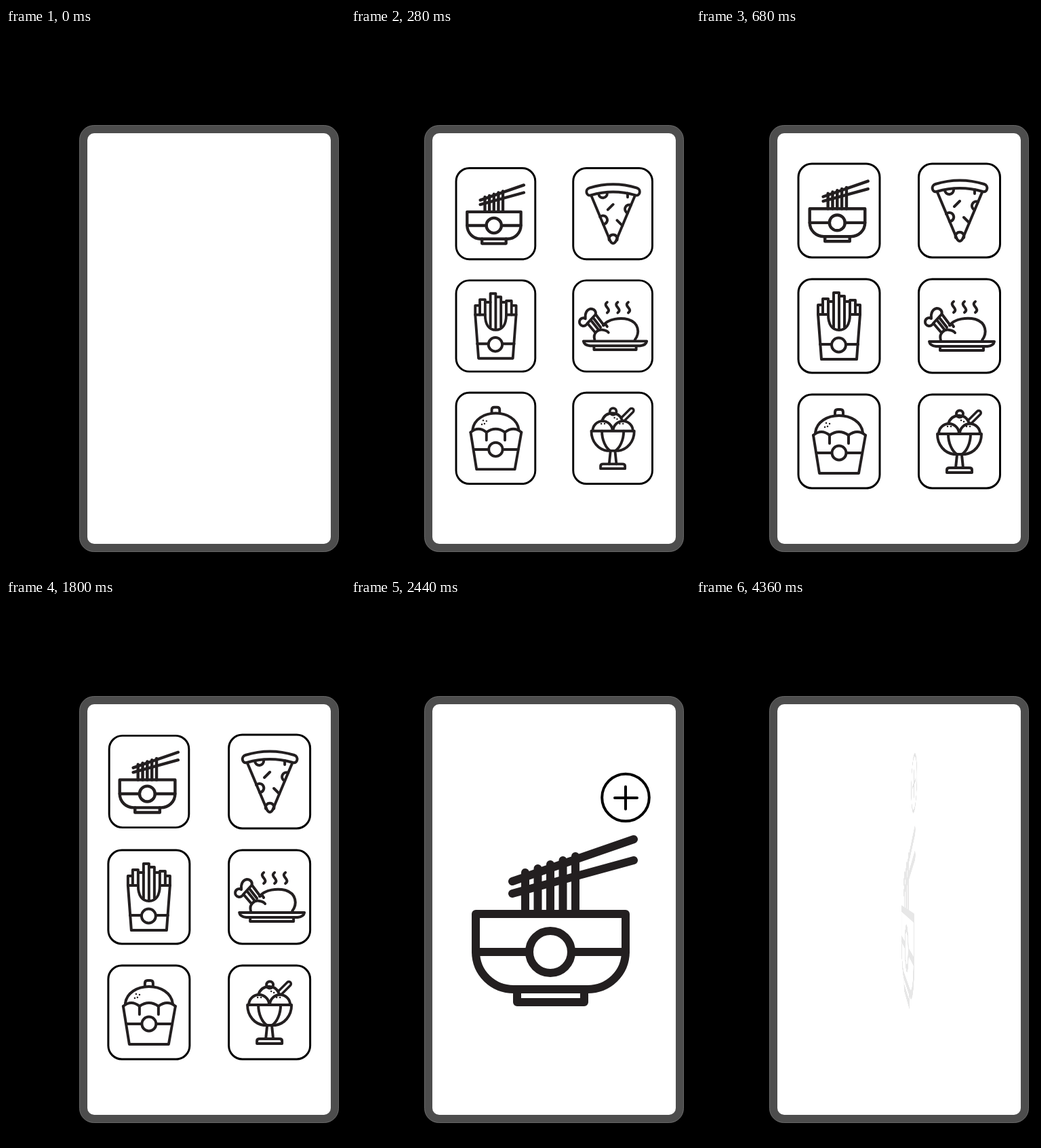
Write an HTML page that moves like this. It is 500 px wide and 800 px high and loops after 4.8 s.

```html
<!DOCTYPE html>
<html lang="en">
<head>
<meta charset="utf-8">
<title>Food menu</title>
<style>
  html, body { margin: 0; width: 100%; height: 100%; overflow: hidden; background: #000; }
  svg { position: absolute; left: 0; top: 0; width: 500px; height: 800px; overflow: hidden; }
  #dish { transform-origin: 312px 425px; }
  .ink { fill: none; stroke: #231f20; stroke-width: 4; stroke-linecap: round; stroke-linejoin: round; }
  .thick { stroke-width: 12; }
  .black { fill: none; stroke: #000; stroke-linecap: round; }
  .dots { stroke-width: 2.4; }
  .white { fill: #fff; }
</style>
</head>
<body>
<svg viewBox="0 0 500 800">
  <defs>
    <clipPath id="screen"><rect x="120" y="155" width="359" height="605" rx="10"/></clipPath>
  </defs>
  <rect x="108.5" y="143.5" width="382" height="628" rx="21" fill="#4d4d4d" stroke="#858585" stroke-width=".7"/>
  <rect x="120" y="155" width="359" height="605" rx="10" fill="#fff"/>
  <g clip-path="url(#screen)">
    <g id="grid">
      <g id="left"></g>
      <g id="right"></g>
      <g id="bowlCard"></g>
    </g>
  </g>
</svg>
<svg id="dish" viewBox="0 0 500 800">
  <g id="bowl" class="ink thick">
    <path d="M257 403V464M275.500 397V464M294 391V464M312.500 385V464M331 379V464"/>
    <path d="M238 416L417 354M238 434L417 385"/>
    <path d="M184 464H405V519C405 552 379 575 349 575H240C210 575 184 552 184 519Z"/>
    <path d="M184 520H263M325 520H405M245 575V594H344V575"/>
    <circle cx="294" cy="520" r="31"/>
  </g>
  <g id="plus" class="black" stroke-width="4">
    <circle cx="405" cy="292.500" r="34.800"/>
    <path d="M389 293H422M405 276.500V309.500"/>
  </g>
</svg>

<script>
const LOOP = 4800, STEP = 40;
const $ = id => document.getElementById(id);
const path = (d, cls = "") => `<path class="${cls}" d="${d}"/>`;
const disc = (x, y, r) => `<circle cx="${x}" cy="${y}" r="${r}"/>`;
const ink = s => `<g class="ink">${s}</g>`;
const card = (x, y) =>
  `<rect class="black" stroke-width="3" x="${x}" y="${y}" width="120" height="138" rx="20"/>`;

const pizza = ink(
  path("M356 242L385 311Q389 317 393 311L422 242") +
  path("M353 230Q389 219 425 230C432 232 430 243 423 241Q389 231 355 241C348 243 346 232 353 230Z", "white") +
  path("M367 239A6.500 6.500 0 1 0 380 238M416 256A6.500 6.500 0 1 0 411 268") +
  path("M369 274A6.500 6.500 0 1 1 374 285M383 309A6.300 6.300 0 1 1 395 309") +
  path("M381 263L389 255M395 279L403 287M411 238V244"));

const fries = ink(
  path("M180 422V408H187M187 422V399H195V422M195 403H203") +
  path("M203 441V390H211V444M211 395H219V441M219 403H227V422") +
  path("M227 401H235V422M235 408H242V422") +
  path("M180 422H195C195 437 201 445 211 445C221 445 227 437 227 422H242L237 488H185Z") +
  path("M183 466H200M221 466H239") + disc(210.5, 467, 10.5));

const roast = ink(
  path("M374 438C382 428 400 426 412 429C428 434 430 449 422 460") +
  path("M361 460C358 450 366 443 374 445Q380 446 382 449M374 438Q377 434 380 440") +
  path("M350 435L362 449M355 430L367 445M359 427L370 441M363 422L375 438") +
  path("M350 435C347 442 337 439 338 432C339 427 344 426 347 428C346 420 349 414 355 413C361 413 364 418 362 422Z", "white") +
  path("M344 462H440Q439 468 430 469H354Q345 468 344 462ZM360 471V475H424V471") +
  [380, 396, 412].map(x => path(`M${x} 403c-8 6 8 10 0 16`)).join(""));

const cake = ink(
  path("M205 571V566Q205 562 209 562H213Q217 562 217 566V571") +
  path("M176 596C178 580 194 571 211 571C228 571 244 580 246 596") +
  path("M173 600L182 656H240L250 600") +
  path("M173 600Q185 590 197 600V612M197 600Q211 590 225 600V612M225 600Q238 590 250 600") +
  path("M178 626H200M222 626H245") + disc(211, 626, 10.5) +
  path("M192 582h.1M197 583h.1M194 587h.1M190 588h.1", "dots"));

const sundae = ink(
  path("M372 583Q376 571 388 571Q398 571 402 580") + disc(389, 568.5, 5) +
  `<g stroke-width="10">${path("M405 579L417 567")}</g>` +
  `<g stroke="#fff" stroke-width="3">${path("M405 579L417 567")}</g>` +
  path("M358 598a15 15 0 0 1 30 0M389 598a15 15 0 0 1 30 0") +
  path("M356 598H421C421 615 410 626 397 628H380C367 626 356 615 356 598Z", "white") +
  path("M372 598C372 612 378 624 385 628M405 598C405 612 399 624 392 628") +
  path("M385 629L383 648M392 629L394 648") +
  path("M370 655V651Q370 648 374 648H403Q407 648 407 651V655Z") +
  path("M391 578h.1M395 580h.1M371 587h.1M376 587h.1M399 587h.1M404 587h.1", "dots"));

$("left").innerHTML = card(151, 370) + fries + card(151, 540) + cake;
$("right").innerHTML = card(328.5, 200) + pizza + card(328.5, 370) + roast + card(328.5, 540) + sundae;
$("bowlCard").innerHTML = card(151, 200);

const ramp = (t, from, to) => Math.min(1, Math.max(0, (t - from) / (to - from)));
const mix = (a, b, p) => a + (b - a) * p;
const smooth = p => p * p * (3 - 2 * p);
const inOut = p => p < .5 ? 4 * p ** 3 : 1 - 4 * (1 - p) ** 3;
const about = (x, y, s) => `translate(${x} ${y}) scale(${s}) translate(${-x} ${-y})`;
const move = (id, value) => $(id).setAttribute("transform", value);
const show = (id, on) => { $(id).style.display = on ? "" : "none"; };

// Damped spring from 0 to 1 with an overshoot of about 20 %
function spring(t) {
  if (t >= 680) return 1;
  const a = .0201 * t;
  return 1 - Math.exp(-.512 * a) * (Math.cos(a) + .512 * Math.sin(a));
}

function draw(t) {
  const pop = spring(t);
  const go = inOut(ramp(t, 1760, 2440));
  const shrink = 1 - smooth(ramp(t, 1760, 2240));
  const add = smooth(ramp(t, 2000, 2400));
  const turn = ramp(t, 4120, 4360);
  const zoom = about(300, 439, pop);

  show("grid", pop > 0 && go < 1);
  move("grid", zoom);
  move("left", `translate(${-160 * go} 0)`);
  move("right", `translate(${160 * go} 0)`);
  show("bowlCard", shrink > 0);
  move("bowlCard", about(211, 269, shrink));

  show("bowl", pop > 0);
  move("bowl", `${zoom} translate(${mix(99.8, 0, go)} ${mix(95, 0, go)}) scale(${mix(.369, 1, go)})`);
  show("plus", add > 0);
  move("plus", about(405, 292.5, add));

  const dish = $("dish").style;
  dish.opacity = 1 - .89 * turn ** 2;
  dish.transform = turn
    ? `perspective(560px) rotateY(${-85 * turn ** 1.2}deg) scale(${1 - .03 * turn})`
    : "none";
}

const start = performance.now();
function tick() {
  const t = (performance.now() - start) % LOOP;
  draw(Math.floor(t / STEP) * STEP);
  requestAnimationFrame(tick);
}
tick();
</script>
</body>
</html>
```
